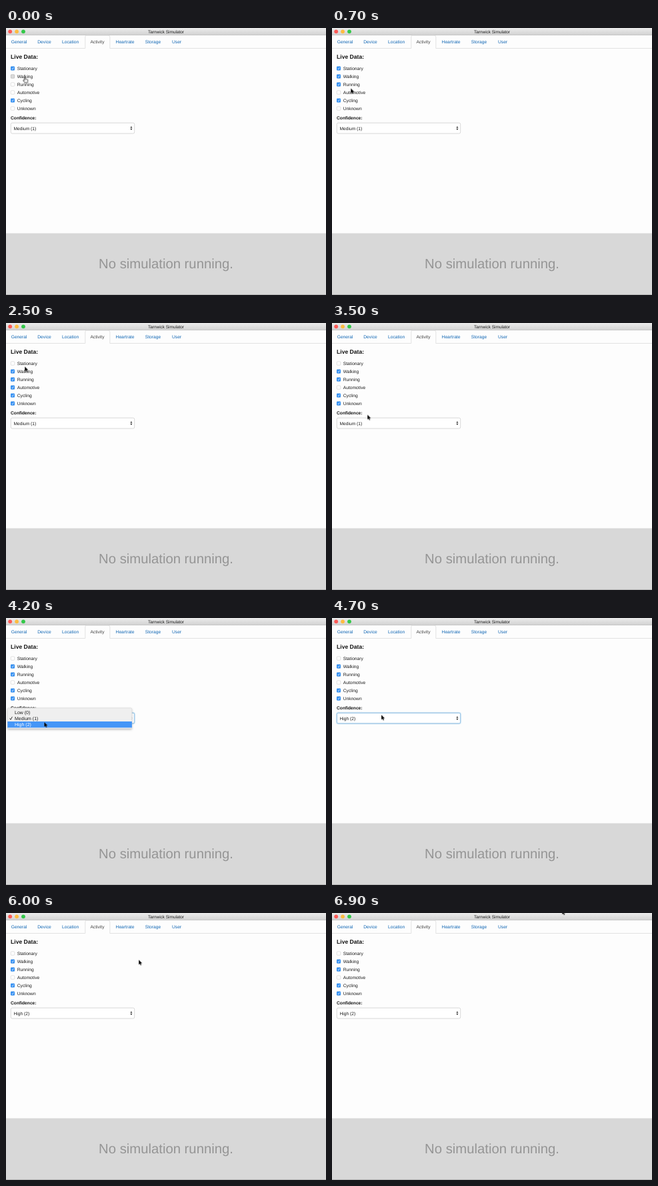
An HTML page that plays this animation: 480 px wide and 400 px high, repeating every 7 s.

```html
<!DOCTYPE html>
<html lang="en">
<head>
<meta charset="utf-8">
<title>Activity simulator</title>
<style>
html, body { margin: 0; width: 100%; height: 100%; overflow: hidden; background: #fdfdfd; }
svg { display: block; width: 480px; height: 400px; }
text { font: 6.68px "Liberation Sans", Arial, sans-serif; fill: #1c1c1c; text-rendering: geometricPrecision; }
.title { font-size: 6.45px; text-anchor: middle; }
.tabs text { fill: #0f66b4; }
.tabs .active { fill: #444; }
.bold { font-weight: bold; fill: #151515; }
.heading { font-size: 8.6px; }
.status { font-size: 20.3px; fill: #959595; text-anchor: middle; }
.menu text { font-size: 7px; fill: #1c1c1c; }

/* 100 ms = 1.42857 % */
.walking, .running, .automotive, .unknown, .stationary, .press, .menu, .glow,
.medium, .high, .bar, .menu .item-medium, .menu .item-high, .hand, .arrow {
  animation: 7s step-end infinite;
}
.walking { animation-name: walking; }
.running { animation-name: running; }
.automotive { animation-name: automotive; }
.unknown { animation-name: unknown; }
.stationary { animation-name: stationary; }
.press { animation-name: press; }
.menu { animation-name: menu; }
.glow { animation-name: glow; }
.medium { animation-name: medium; }
.high { animation-name: high; }
.bar { animation-name: bar; }
.menu .item-medium { animation-name: item-medium; }
.menu .item-high { animation-name: item-high; }
.hand { animation-name: hand; }
.arrow { animation-name: arrow; }
.cursor { animation: move 7s infinite; }

@keyframes walking { 0% { opacity: 0 } 1.42%, 100% { opacity: 1 } }
@keyframes running { 0% { opacity: 0 } 7.14%, 100% { opacity: 1 } }
@keyframes automotive { 0% { opacity: 0 } 12.85% { opacity: 1 } 44.28%, 100% { opacity: 0 } }
@keyframes unknown { 0% { opacity: 0 } 27.14%, 100% { opacity: 1 } }
@keyframes stationary { 0% { opacity: 1 } 32.85%, 100% { opacity: 0 } }
@keyframes press {
  0% { opacity: .14; transform: translateY(12px) }
  1.42% { opacity: 0 }
  5.71% { opacity: .14; transform: translateY(24px) }
  7.14% { opacity: 0 }
  11.42% { opacity: .14; transform: translateY(36px) }
  12.85% { opacity: 0 }
  25.71% { opacity: .14; transform: translateY(60px) }
  27.14% { opacity: 0 }
  31.42% { opacity: .14; transform: none }
  32.85% { opacity: 0 }
  42.85% { opacity: .14; transform: translateY(36px) }
  44.28%, 100% { opacity: 0 }
}
@keyframes menu { 0% { opacity: 0 } 54.28% { opacity: 1 } 64.28%, 100% { opacity: 0 } }
@keyframes glow { 0% { opacity: 0 } 54.28% { opacity: 1 } 78.57%, 100% { opacity: 0 } }
@keyframes medium { 0% { opacity: 1 } 64.28%, 100% { opacity: 0 } }
@keyframes high { 0% { opacity: 0 } 64.28%, 100% { opacity: 1 } }
@keyframes bar { 0% { transform: translateY(-9.2px) } 57.14%, 100% { transform: none } }
@keyframes item-medium { 0% { fill: #fff } 57.14%, 100% { fill: #1c1c1c } }
@keyframes item-high { 0% { fill: #1c1c1c } 57.14%, 100% { fill: #fff } }
@keyframes hand {
  0%, 5.71%, 11.42%, 17.14%, 24.28%, 31.42%, 41.42% { opacity: 1 }
  4.28%, 10%, 15.71%, 18.57%, 28.57%, 34.28%, 45.71%, 100% { opacity: 0 }
}
@keyframes arrow {
  0%, 5.71%, 11.42%, 17.14%, 24.28%, 31.42%, 41.42% { opacity: 0 }
  4.28%, 10%, 15.71%, 18.57%, 28.57%, 34.28%, 45.71%, 100% { opacity: 1 }
}
/* each leg advances once per 100 ms */
@keyframes move {
  0%, 2.85% { transform: translate(28.3px, 73.2px); animation-timing-function: steps(2) }
  5.71%, 8.57% { transform: translate(28.3px, 84.5px); animation-timing-function: steps(2) }
  11.42%, 14.28% { transform: translate(28.3px, 96.5px); animation-timing-function: steps(2) }
  17.14% { transform: translate(28px, 108px); animation-timing-function: steps(2) }
  20% { transform: translate(27.6px, 112.9px); animation-timing-function: steps(3) }
  24.28%, 28.57% { transform: translate(28px, 120px); animation-timing-function: steps(2) }
  31.42%, 34.28% { transform: translate(28px, 60.5px); animation-timing-function: steps(1) }
  35.71% { transform: translate(28.2px, 65.3px); animation-timing-function: steps(4) }
  41.42%, 45.71% { transform: translate(28.2px, 96.5px); animation-timing-function: steps(3) }
  50% { transform: translate(53.2px, 137.5px); animation-timing-function: steps(3) }
  54.28% { transform: translate(56px, 149.5px); animation-timing-function: steps(4) }
  60% { transform: translate(57.4px, 156px); animation-timing-function: steps(3) }
  64.28% { transform: translate(58px, 157.5px); animation-timing-function: steps(7) }
  74.28% { transform: translate(114.4px, 114.5px); animation-timing-function: steps(3) }
  78.57% { transform: translate(118px, 112px); animation-timing-function: steps(14) }
  98.57%, 100% { transform: translate(345.2px, -5px) }
}
</style>
</head>
<body>
<svg viewBox="0 0 480 400">
  <defs>
    <linearGradient id="chrome" x2="0" y2="1">
      <stop stop-color="#ebebeb"/><stop offset="1" stop-color="#d2d2d2"/>
    </linearGradient>
    <filter id="shadow" x="-10%" y="-30%" width="120%" height="180%">
      <feDropShadow dx="0" dy="1.5" stdDeviation="1.6" flood-opacity=".25"/>
    </filter>
    <rect id="box" x="7.3" y="57.8" width="5.4" height="5.4" rx="1" fill="#fff" stroke="#cfcfcf" stroke-width=".6"/>
    <g id="tick">
      <rect x="7" y="57.5" width="6" height="6" rx="1.1" fill="#3590f2"/>
      <path d="M8.6 60.7l1.1 1.2 1.8-2.8" fill="none" stroke="#fff" stroke-width=".75"/>
    </g>
  </defs>

  <rect width="480" height="400" fill="#fdfdfd"/>
  <rect width="480" height="10.5" fill="url(#chrome)"/>
  <path d="M0 10.5H480" stroke="#b8b8b8" stroke-width=".7"/>
  <circle cx="6.2" cy="5.3" r="2.9" fill="#fc5b57"/>
  <circle cx="16.1" cy="5.3" r="2.9" fill="#fdbc40"/>
  <circle cx="26" cy="5.3" r="2.9" fill="#34c84a"/>
  <text class="title" x="240" y="7.8">Tarnwick Simulator</text>

  <path d="M0 30.5H118.8V13q0-1.8 1.8-1.8H154q1.8 0 1.8 1.8V30.5H480" fill="none" stroke="#dcdcdc" stroke-width=".8"/>
  <g class="tabs">
    <text x="7.7" y="23">General</text>
    <text x="47.3" y="23">Device</text>
    <text x="84" y="23">Location</text>
    <text class="active" x="126.4" y="23">Activity</text>
    <text x="164.6" y="23">Heartrate</text>
    <text x="208.8" y="23">Storage</text>
    <text x="249" y="23">User</text>
  </g>

  <text class="bold heading" x="7" y="45.5">Live Data:</text>
  <g>
    <use href="#box"/><use href="#tick" class="stationary"/>
    <text x="16.8" y="63">Stationary</text>
  </g>
  <g transform="translate(0 12)">
    <use href="#box"/><use href="#tick" class="walking"/>
    <text x="16.8" y="63">Walking</text>
  </g>
  <g transform="translate(0 24)">
    <use href="#box"/><use href="#tick" class="running"/>
    <text x="16.8" y="63">Running</text>
  </g>
  <g transform="translate(0 36)">
    <use href="#box"/><use href="#tick" class="automotive"/>
    <text x="16.8" y="63">Automotive</text>
  </g>
  <g transform="translate(0 48)">
    <use href="#tick"/>
    <text x="16.8" y="63">Cycling</text>
  </g>
  <g transform="translate(0 60)">
    <use href="#box"/><use href="#tick" class="unknown"/>
    <text x="16.8" y="63">Unknown</text>
  </g>
  <rect class="press" x="7" y="57.5" width="6" height="6" rx="1.1"/>

  <text class="bold" x="7" y="137">Confidence:</text>
  <rect x="7.3" y="142.2" width="185.4" height="15.8" rx="2" fill="#fff" stroke="#cfcfcf" stroke-width=".8"/>
  <g class="glow" fill="none">
    <rect x="7" y="142" width="186" height="16.2" rx="2.3" stroke="#66afe9" stroke-opacity=".18" stroke-width="2.4"/>
    <rect x="7.3" y="142.2" width="185.4" height="15.8" rx="2" stroke="#8cc4ee" stroke-width=".8"/>
  </g>
  <text class="medium" x="11.5" y="152.5">Medium (1)</text>
  <text class="high" x="11.5" y="152.5">High (2)</text>
  <path d="M186.4 149.5l1.5-2.2 1.5 2.2zM186.4 150.8l1.5 2.2 1.5-2.2z" fill="#222"/>

  <rect y="307.5" width="480" height="92.5" fill="#d8d8d8"/>
  <path d="M0 399.6H480" stroke="#a5a5a5" stroke-width=".8"/>
  <text class="status" x="240" y="360.3">No simulation running.</text>

  <g class="menu">
    <rect x="2.3" y="134.8" width="186.6" height="31" rx="1.8" fill="#efefef" stroke="#c4c4c4" stroke-width=".4" filter="url(#shadow)"/>
    <rect class="bar" x="2.3" y="155" width="186.6" height="9.3" fill="#4596f7"/>
    <text x="13" y="143.6">Low (0)</text>
    <text class="item-medium" x="13" y="152.7">Medium (1)</text>
    <text class="item-high" x="13" y="162">High (2)</text>
    <path d="M5.6 150.3l1.4 2 2.4-4.4" fill="none" stroke="#222" stroke-width=".9"/>
  </g>

  <g class="cursor" stroke-linejoin="round">
    <path class="arrow" d="M0 0V7.2L1.7 5.6 2.8 8.2 3.9 7.7 2.8 5.2H5.1Z" fill="#000" stroke="#fff" stroke-opacity=".6" stroke-width=".4" paint-order="stroke"/>
    <path class="hand" d="M-.8 .6Q0-.4 .7 .6V3.4Q1.6 2.8 2.2 3.6 3 3 3.5 4 4.5 3.6 4.6 4.8V6.4L3.7 8.8H-.2L-2.4 5.7Q-2.7 4.4-1.6 4.7L-.8 5.4Z" fill="#eee" stroke="#222" stroke-width=".8"/>
  </g>
</svg>
</body>
</html>
```
